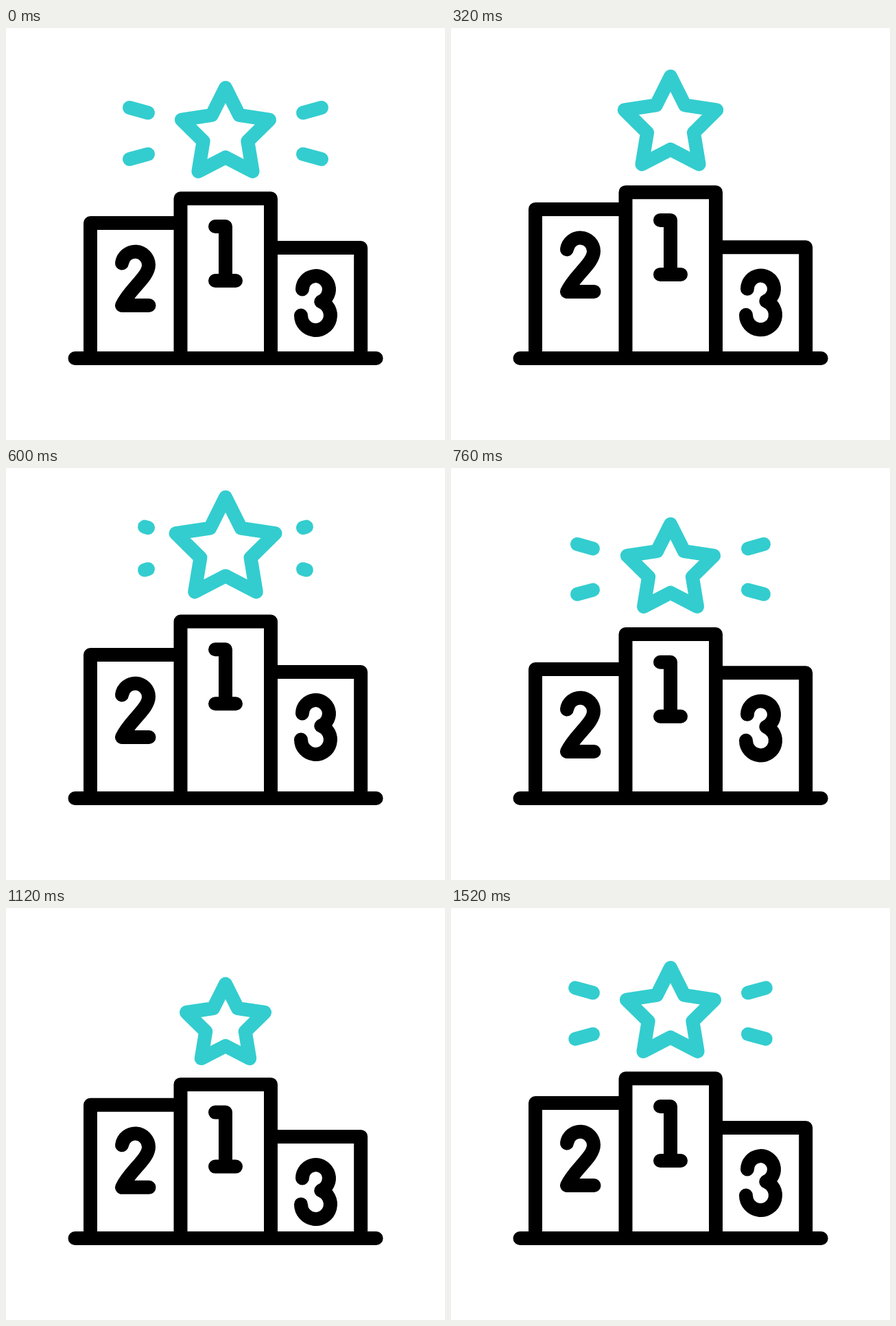
An HTML page with a canvas for the animation above (1560 ms loop, 640 px wide and 600 px high).

```html
<!DOCTYPE html>
<html lang="en">
<head>
<meta charset="utf-8">
<title>Podium</title>
<style>
  html, body { margin: 0; width: 100%; height: 100%; overflow: hidden; background: #fff; }
  canvas { display: block; width: 640px; height: 600px; }
</style>
</head>
<body>
<canvas id="stage" width="640" height="600"></canvas>
<script>
const ctx = document.getElementById('stage').getContext('2d');
const LOOP = 1560, STEP = 40, SEGMENT = 400;
const BLACK = '#000', TEAL = '#33cdcf';
const FLOOR = 481, MID = 320;
const POSTS = [123, 254.5, 386, 517.2];

// Eased progress from 0 to 1 between two times.
function ease(t, from, to) {
  const x = Math.min(1, Math.max(0, (t - from) / (to - from)));
  return x * x * (3 - 2 * x);
}

// Rest -> peak -> trough -> rest, each leg lasting one segment.
function bounce(t, start, peak, trough) {
  const leg = i => ease(t, start + i * SEGMENT, start + (i + 1) * SEGMENT);
  return peak * leg(0) + (trough - peak) * leg(1) - trough * leg(2);
}

function stroke(path, color, dy = 0) {
  ctx.save();
  ctx.translate(0, dy);
  ctx.strokeStyle = color;
  ctx.stroke(path);
  ctx.restore();
}

const shape = d => new Path2D(d);
const digits = {
  one: shape('M305 289H320V368M305 368H335'),
  two: shape('M169 342.5A19.6 19.6 0 0 1 208 345C208 363 180 380 169 404H208.5'),
  three: shape('M432 380.5A19.5 19.5 0 1 1 459.3 398.5A21.5 21.5 0 1 1 430 418.5')
};

function drawPodium(t) {
  const first = bounce(t, 160, -25.9, 13.3);
  const second = bounce(t, 40, -25.6, 13);
  const third = bounce(t, 280, -25.7, 13.3);
  const [a, b, c, d] = POSTS;
  const frame = `M${a} ${FLOOR}V${284 + second}H${b}` +
    `M${b} ${FLOOR}V${248.3 + first}H${c}V${FLOOR}` +
    `M${c} ${320 + third}H${d}V${FLOOR}` +
    `M100.5 ${FLOOR}H539.7`;
  stroke(shape(frame), BLACK);
  stroke(digits.one, BLACK, first);
  stroke(digits.two, BLACK, second);
  stroke(digits.three, BLACK, third);
}

function drawStar(t, dy) {
  const scale = 1 + bounce(t, 160, 0.14, -0.17);
  const path = new Path2D();
  for (let i = 0; i < 10; i++) {
    const radius = i % 2 ? 34 : 67.4;
    const angle = i * Math.PI / 5;
    path.lineTo(MID + scale * radius * Math.sin(angle),
                148 + scale * (6.4 - radius * Math.cos(angle)));
  }
  path.closePath();
  stroke(path, TEAL, dy);
}

// Rays grow outwards, then retract from the inside; this happens twice per loop.
function drawRays(t, dy) {
  let head, tail;
  if (t < 400) {
    head = 1;
    tail = ease(t, 0, 320);
  } else if (t < 1200) {
    head = ease(t, 510, 840);
    tail = ease(t, 790, 1110);
  } else {
    head = ease(t, 1240, 1560);
    tail = 0;
  }
  if (head <= tail) return;

  const path = new Path2D();
  for (const side of [-1, 1]) {
    for (const [y, rise] of [[123.5, -7.5], [183.7, 7.3]]) {
      const x = k => MID + side * (113 + 27 * k);
      path.moveTo(x(tail), y + rise * tail);
      path.lineTo(x(head), y + rise * head);
    }
  }
  stroke(path, TEAL, dy);
}

function render(now) {
  const t = Math.floor((now % LOOP) / STEP) * STEP;
  const lift = bounce(t, 160, -38.3, 26);
  ctx.fillStyle = '#fff';
  ctx.fillRect(0, 0, 640, 600);
  ctx.lineWidth = 20;
  ctx.lineCap = ctx.lineJoin = 'round';
  drawPodium(t);
  drawStar(t, lift);
  drawRays(t, lift);
}

const begin = performance.now();
function tick() {
  render(performance.now() - begin);
  requestAnimationFrame(tick);
}
tick();
</script>
</body>
</html>
```
